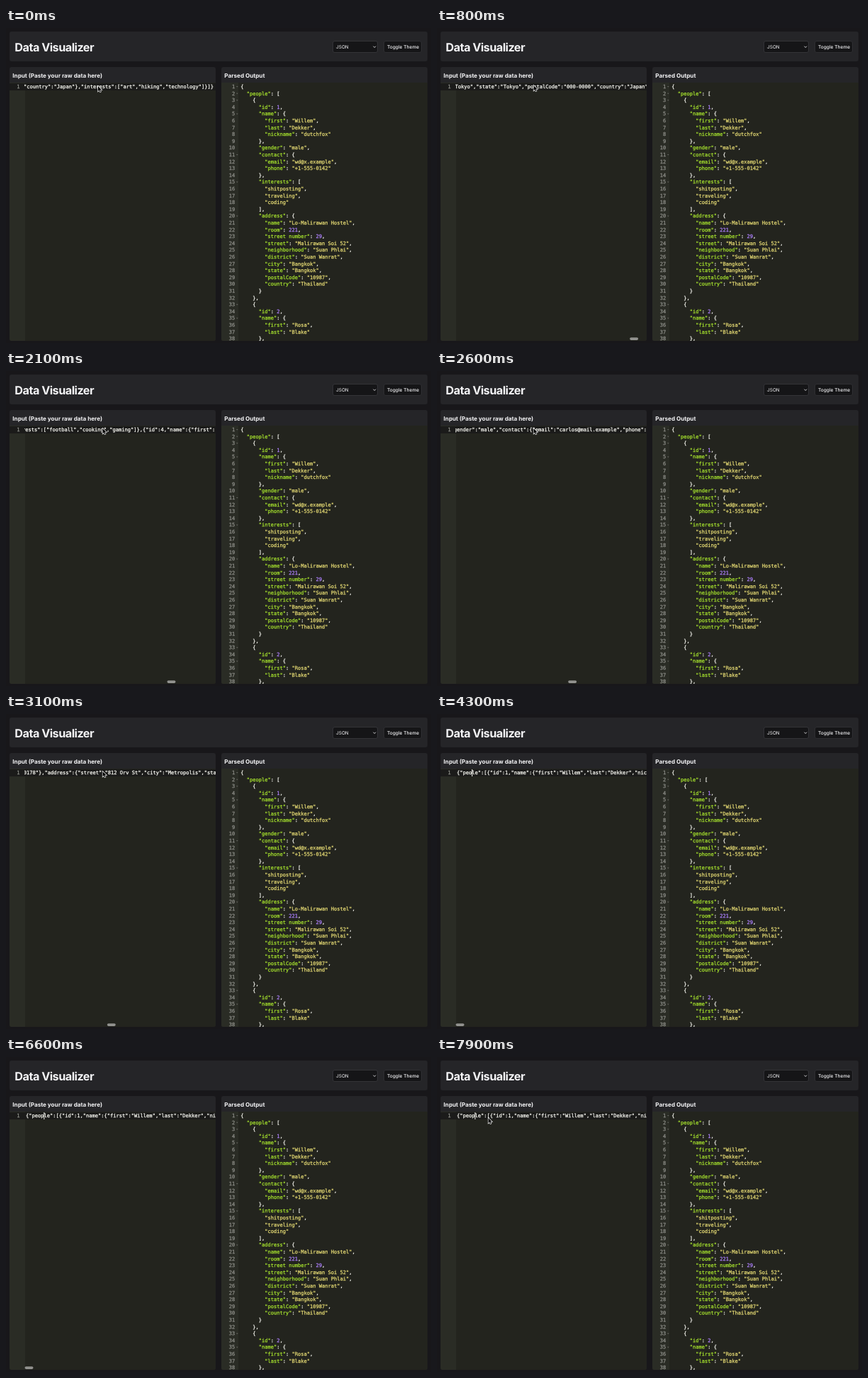
Recreate the animation shown at these times as an HTML page with a canvas. Size 600x444 px, loop 8 s.

```html
<!DOCTYPE html>
<html lang="en">
<head>
<meta charset="utf-8">
<title>Data Visualizer</title>
<style>
  html, body { margin: 0; width: 100%; height: 100%; overflow: hidden; background: #18171a; }
  canvas { display: block; }
</style>
</head>
<body>
<canvas id="stage" width="600" height="444"></canvas>
<script>
const LOOP = 8000, STEP = 100;
const CHAR = 4.253, LINE = 9.6, TEXT_X = 28, BASELINE = 85;
const MONO = '7.06px "DejaVu Sans Mono", monospace';
const COLORS = { key: '#a6e22e', string: '#e6db74', number: '#ae81ff', plain: '#f8f8f2', gutter: '#8f908a' };

const ctx = document.getElementById('stage').getContext('2d');
ctx.textRendering = 'geometricPrecision';

const people = [
  { id: 1, name: { first: 'Willem', last: 'Dekker', nickname: 'dutchfox' }, gender: 'male',
    contact: { email: 'wd@x.example', phone: '+1-555-0142' },
    interests: ['shitposting', 'traveling', 'coding'],
    address: { name: 'Lo-Malirawan Hostel', room: 221, 'street number': 29, street: 'Malirawan Soi 52',
      neighborhood: 'Suan Phlai', district: 'Suan Wanrat', city: 'Bangkok', state: 'Bangkok',
      postalCode: '10987', country: 'Thailand' } },
  { id: 2, name: { first: 'Rosa', last: 'Blake' }, gender: 'female',
    contact: { email: 'rosa@mail.example', phone: '+1-555-0178' },
    address: { street: '812 Orv St', city: 'Metropolis', state: 'NY', postalCode: '00000', country: 'USA' },
    interests: ['reading', 'music', 'yoga'] },
  { id: 3, name: { first: 'Carlos', last: 'Rivero' }, gender: 'male',
    contact: { email: 'carlos@mail.example', phone: '+52-55-0000-0167' },
    address: { street: '77 Calle Lumo', city: 'Mexico City', state: 'CDMX', postalCode: '00000', country: 'Mexico' },
    interests: ['football', 'cooking', 'gaming'] },
  { id: 4, name: { first: 'Emi', last: 'Okabe' }, gender: 'female',
    contact: { email: 'emi@mail.example', phone: '+81-90-0000-0142' },
    address: { street: '4-7-9 Minasei', city: 'Tokyo', state: 'Tokyo', postalCode: '000-0000', country: 'Japan' },
    interests: ['art', 'hiking', 'technology'] }
];
const fullText = JSON.stringify({ people });
const maxScroll = TEXT_X + fullText.length * CHAR - 293;

// Scroll offset that puts the given snippet at screen position x
const scrollTo = (snippet, x) => TEXT_X + fullText.indexOf(snippet) * CHAR - x;

const scrollKeys = [
  [400, maxScroll], [1400, scrollTo('"+81', 54)], [2100, scrollTo('"football', 57)],
  [3100, scrollTo('"812', 139.5)], [3800, 0]
];
const pointerKeys = [
  [100, 130, 82], [300, 136.5, 81], [3600, 136.5, 81], [4000, 53, 82], [6700, 56, 83], [7300, 72.5, 86]
];
// Time, word and caret column after each edit
const edits = [[0, 'people', 6], [4300, 'peole', 5], [4500, 'pele', 4], [5900, 'peole', 5], [6500, 'people', 6]];

const within = (t, a, b) => t >= a && t < b;
const clamp01 = v => Math.max(0, Math.min(1, v));

function at(keys, t, channel = 1) {
  const next = keys.findIndex(k => k[0] > t);
  if (next === 0) return keys[0][channel];
  if (next < 0) return keys[keys.length - 1][channel];
  const a = keys[next - 1], b = keys[next];
  return a[channel] + (b[channel] - a[channel]) * (t - a[0]) / (b[0] - a[0]);
}

function box(x, y, w, h, fill, radius = 0, stroke) {
  ctx.beginPath();
  ctx.roundRect(x, y, w, h, radius);
  ctx.fillStyle = fill;
  ctx.fill();
  if (stroke) { ctx.strokeStyle = stroke; ctx.lineWidth = 0.8; ctx.stroke(); }
}

function label(text, x, y, size, weight, spacing = '0px') {
  ctx.font = `${weight} ${size}px Inter, sans-serif`;
  ctx.letterSpacing = spacing;
  ctx.fillStyle = '#f4f4f6';
  ctx.fillText(text, x, y);
  ctx.letterSpacing = '0px';
}

// Monospaced text, slightly thickened by a hairline outline
function code(text, x, y, color) {
  ctx.font = MONO;
  ctx.fillStyle = ctx.strokeStyle = color;
  ctx.lineWidth = 0.25;
  for (let i = 0; i < text.length; i++) {
    const cx = x + i * CHAR;
    if (text[i] === ' ' || cx < -CHAR || cx > 600) continue;
    ctx.fillText(text[i], cx, y);
    ctx.strokeText(text[i], cx, y);
  }
}

function clipped(x, y, w, h, draw) {
  ctx.save();
  ctx.beginPath();
  ctx.rect(x, y, w, h);
  ctx.clip();
  draw();
  ctx.restore();
}

function panel(x, title, gutterWidth) {
  box(x, 55, 291, 386, '#252528', 3);
  label(title, x + 4.3, 69.5, 8.15, 700);
  box(x, 77, 291, 364, '#23241e', [0, 0, 3, 3]);
  box(x, 77, gutterWidth, 364, '#2a2c25', [0, 0, 0, 3]);
}

function header() {
  box(5, 5, 590, 42, '#252528', 3);
  label('Data Visualizer', 12.3, 32.5, 16.2, 700, '-0.5px');
  box(461.5, 18.5, 63, 16, '#151517', 2.5, '#3a3a3e');
  label('JSON', 466, 29, 6.5, 400);
  ctx.beginPath();
  ctx.moveTo(518.5, 25.7);
  ctx.lineTo(520.3, 27.5);
  ctx.lineTo(522.1, 25.7);
  ctx.strokeStyle = '#e8e8ea';
  ctx.lineWidth = 0.9;
  ctx.stroke();
  box(533.5, 18.5, 53, 16, '#151517', 2.5, '#343438');
  label('Toggle Theme', 538, 29, 6.6, 500);
}

function inputPanel(t, word, caretColumn) {
  panel(5, 'Input (Paste your raw data here)', 22);
  box(5, 78, 291, 10, '#1b1b1a');
  code('1', 15.3, BASELINE, COLORS.gutter);
  const scroll = at(scrollKeys, t);
  clipped(26, 77, 270, 364, () => {
    code(fullText.replace('people', word), TEXT_X - scroll, BASELINE, COLORS.plain);
    const caretOn = t >= 4000 && !within(t, 5100, 5500) && !within(t, 7100, 7500);
    if (caretOn) box(TEXT_X + caretColumn * CHAR - 0.2, 78, 1, 10, COLORS.plain);
  });
  // Each scroll or edit shows the scrollbar, which then fades
  const shown = [[500, 4800], [5900, 6300], [6500, 6800]].filter(([from]) => t >= from).pop();
  if (shown) {
    ctx.globalAlpha = clamp01((shown[1] + 300 - t) / 400);
    box(26.5 + scroll / maxScroll * 255.5, 436.3, 12, 3.6, '#92928f', 1.8);
    ctx.globalAlpha = 1;
  }
}

function foldMark(y) {
  ctx.globalAlpha = 0.6;
  ctx.beginPath();
  ctx.moveTo(324.9, y - 2.9);
  ctx.lineTo(327.7, y - 2.9);
  ctx.lineTo(326.3, y - 1.4);
  ctx.fill();
  ctx.globalAlpha = 1;
}

function outputPanel(word) {
  panel(304, 'Parsed Output', 24);
  const lines = JSON.stringify({ [word]: people }, null, 2).split('\n').slice(0, 38);
  clipped(304, 77, 291, 364, () => lines.forEach((line, i) => {
    const y = BASELINE + i * LINE, number = String(i + 1);
    code(number, 323.3 - number.length * CHAR, y, COLORS.gutter);
    if (/[{[]$/.test(line)) foldMark(y);
    for (const m of line.matchAll(/("[^"]*"(?=:))|("[^"]*")|(\d+)|./g)) {
      const kind = m[1] ? 'key' : m[2] ? 'string' : m[3] ? 'number' : 'plain';
      code(m[0], 331.2 + m.index * CHAR, y, COLORS[kind]);
    }
  }));
}

function pointer(x, y) {
  const arrow = new Path2D('M0 0V7.2L1.7 5.7L2.8 8.2L4 7.7L2.9 5.2H5.1Z');
  ctx.save();
  ctx.translate(x, y);
  ctx.strokeStyle = '#fff';
  ctx.lineWidth = 1.3;
  ctx.stroke(arrow);
  ctx.fillStyle = '#000';
  ctx.fill(arrow);
  ctx.restore();
}

function render(t) {
  const [, word, caretColumn] = edits.filter(e => e[0] <= t).pop();
  box(0, 0, 600, 444, '#18171a');
  header();
  inputPanel(t, word, caretColumn);
  outputPanel(word);
  if (!within(t, 4300, 6700)) pointer(at(pointerKeys, t), at(pointerKeys, t, 2));
}

const start = performance.now();
let drawn = -1;
function tick() {
  const t = Math.floor((performance.now() - start) % LOOP / STEP) * STEP;
  if (t !== drawn) render(drawn = t);
  requestAnimationFrame(tick);
}
tick();
</script>
</body>
</html>
```
